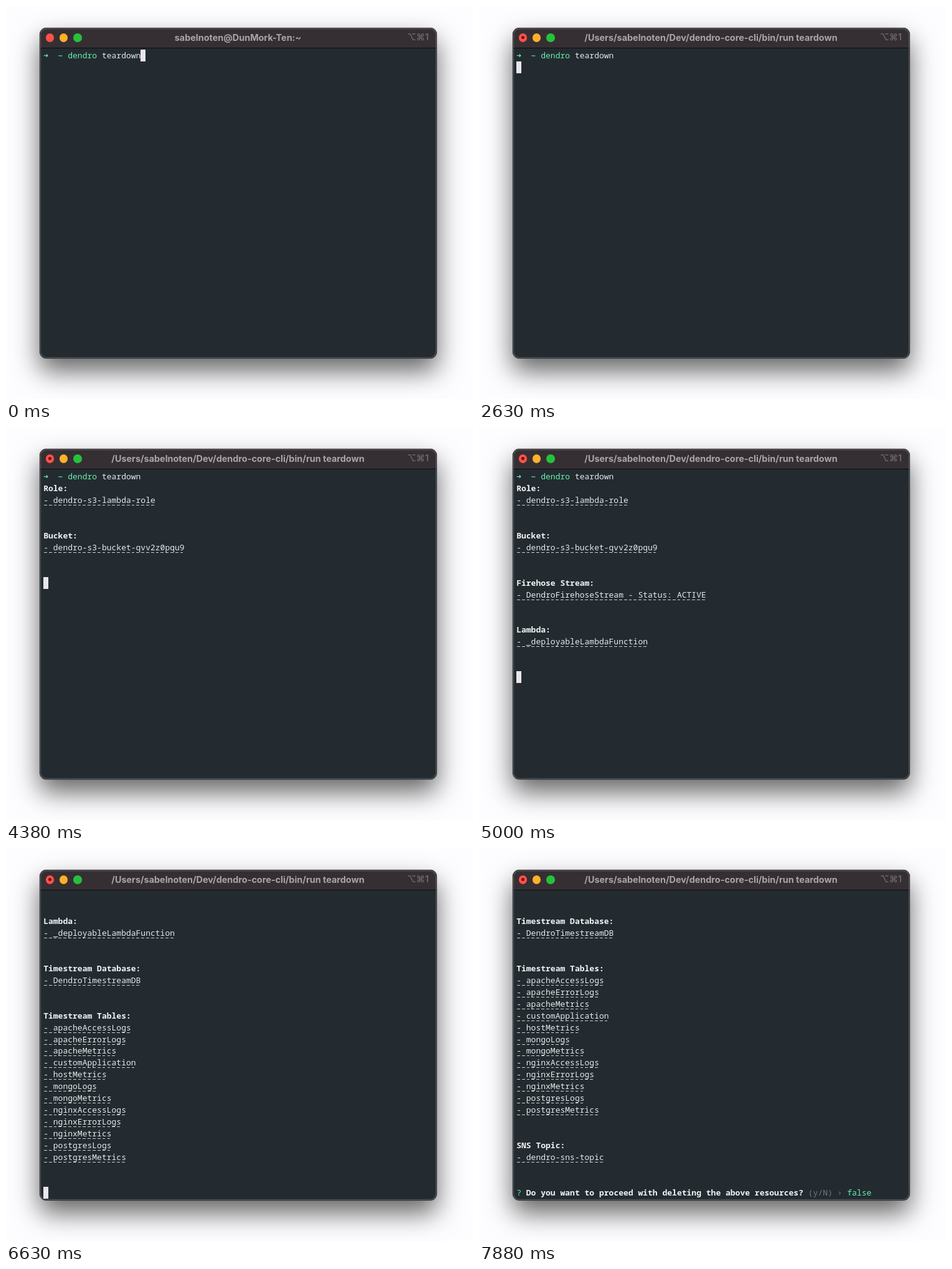
These frames come from a looping animation (750x631 px, 8 s). An HTML page:

```html
<!DOCTYPE html>
<html lang="en">
<head>
<meta charset="utf-8">
<title>Terminal teardown</title>
<style>
  html, body { margin: 0; width: 100%; height: 100%; overflow: hidden; background: #fdfcfe; }
  #window {
    position: absolute; left: 54px; top: 35px; width: 638px; height: 531px;
    border-radius: 11px; overflow: hidden; background: #232b30;
  }
  #shadow {
    position: absolute; left: 54px; top: 35px; width: 638px; height: 531px;
    border-radius: 11px; box-shadow: 0 20px 42px rgba(0, 0, 0, .6), 0 0 1px #000;
  }
  #edge {
    position: absolute; inset: 0; border-radius: 11px;
    box-shadow: inset 0 0 0 1px #2a2a2d, inset 0 0 0 2px rgba(255, 255, 255, .24);
  }
  #bar {
    height: 32px; border-bottom: 1px solid #0b0c0d; background: #352f33;
    font: 700 14.4px/31px Inter, sans-serif; color: #aaa5a8; white-space: pre;
  }
  #title { position: absolute; left: 0; width: 637px; top: 0; text-align: center; }
  #shortcut { position: absolute; right: 13px; top: -1px; color: #6d676a; font-weight: 600; }
  .light { position: absolute; top: 9.3px; width: 13.4px; height: 13.4px; border-radius: 50%; }
  #busy { position: absolute; left: 4.2px; top: 4.2px; width: 5px; height: 5px; border-radius: 50%; background: #7c0a08; }
  #screen {
    position: absolute; left: 6.2px; top: 35.3px; color: #e6e9eb; white-space: pre;
    font: 13.02px/18.95px "Noto Sans Mono", "DejaVu Sans Mono", monospace;
    font-variant-ligatures: none;
  }
  #screen div { height: 18.95px; }
  b { font-weight: 700; color: #f2f4f5; }
  i { font-style: normal; color: #68f0ac; }
  i b { color: inherit; }
  s { text-decoration: none; color: #737a7e; }
  u {
    display: inline-block; height: 18.95px; vertical-align: top; text-decoration: none;
    background: repeating-linear-gradient(90deg, #c9cdcf 0 4.7px, transparent 0 7.812px) 1px 17px / 100% 1px no-repeat;
  }
  .arrow { display: inline-block; width: 1ch; height: 18.95px; vertical-align: top; font-size: 13px; }
  .cursor { display: inline-block; width: 8px; height: 18.95px; vertical-align: top; background: #e9e6ee; }
</style>
</head>
<body>
<div id="shadow"></div>
<div id="window">
  <div id="bar">
    <span class="light" style="left:9.5px;background:#fe5249"><span id="busy"></span></span>
    <span class="light" style="left:31.8px;background:#ffb029"></span>
    <span class="light" style="left:54.2px;background:#26c13b"></span>
    <span id="title"></span>
    <span id="shortcut">⌥⌘1</span>
  </div>
  <div id="screen"></div>
  <div id="edge"></div>
</div>
<script>
const LOOP = 8000, ROWS = 26, START = 130, CONFIRM = 7130;
const IDLE_TITLE = 'sabelnoten@DunMork-Ten:~';
const BUSY_TITLE = '/Users/sabelnoten/Dev/dendro-core-cli/bin/run teardown';
const CURSOR = '<span class="cursor"></span>';
const COMMAND = '<i><b><span class="arrow">➜</span>  ~</b> dendro</i> teardown';
const QUESTION = '<i>?</i> <b>Do you want to proceed with deleting the above resources?</b> <s>(y/N) ›</s> <i>false</i>';

// Each section: time it is printed, heading, items
const sections = [
  [3630, 'Role', 'dendro-s3-lambda-role'],
  [4130, 'Bucket', 'dendro-s3-bucket-qvv2z0pqu9'],
  [4500, 'Firehose Stream', 'DendroFirehoseStream - Status: ACTIVE'],
  [4880, 'Lambda', '_deployableLambdaFunction'],
  [5500, 'Timestream Database', 'DendroTimestreamDB'],
  [6500, 'Timestream Tables', 'apacheAccessLogs', 'apacheErrorLogs', 'apacheMetrics',
    'customApplication', 'hostMetrics', 'mongoLogs', 'mongoMetrics', 'nginxAccessLogs',
    'nginxErrorLogs', 'nginxMetrics', 'postgresLogs', 'postgresMetrics'],
  [6880, 'SNS Topic', 'dendro-sns-topic'],
];

const byId = id => document.getElementById(id);
const screenEl = byId('screen'), titleEl = byId('title'), busyEl = byId('busy');

function linesAt(t) {
  if (t < START) return [COMMAND + CURSOR];
  const lines = [COMMAND];
  for (const [at, heading, ...items] of sections) {
    if (t >= at) lines.push(`<b>${heading}:</b>`, ...items.map(item => `<u>- ${item}</u>`), '', '');
  }
  lines.push(t < CONFIRM ? CURSOR : QUESTION);
  return lines.slice(-ROWS);
}

let shown = '';
function draw() {
  const t = performance.now() % LOOP;
  const html = linesAt(t).map(line => `<div>${line}</div>`).join('');
  if (html !== shown) {
    screenEl.innerHTML = shown = html;
    titleEl.textContent = t < START ? IDLE_TITLE : BUSY_TITLE;
    busyEl.hidden = t < START;
  }
  requestAnimationFrame(draw);
}
draw();
</script>
</body>
</html>
```
